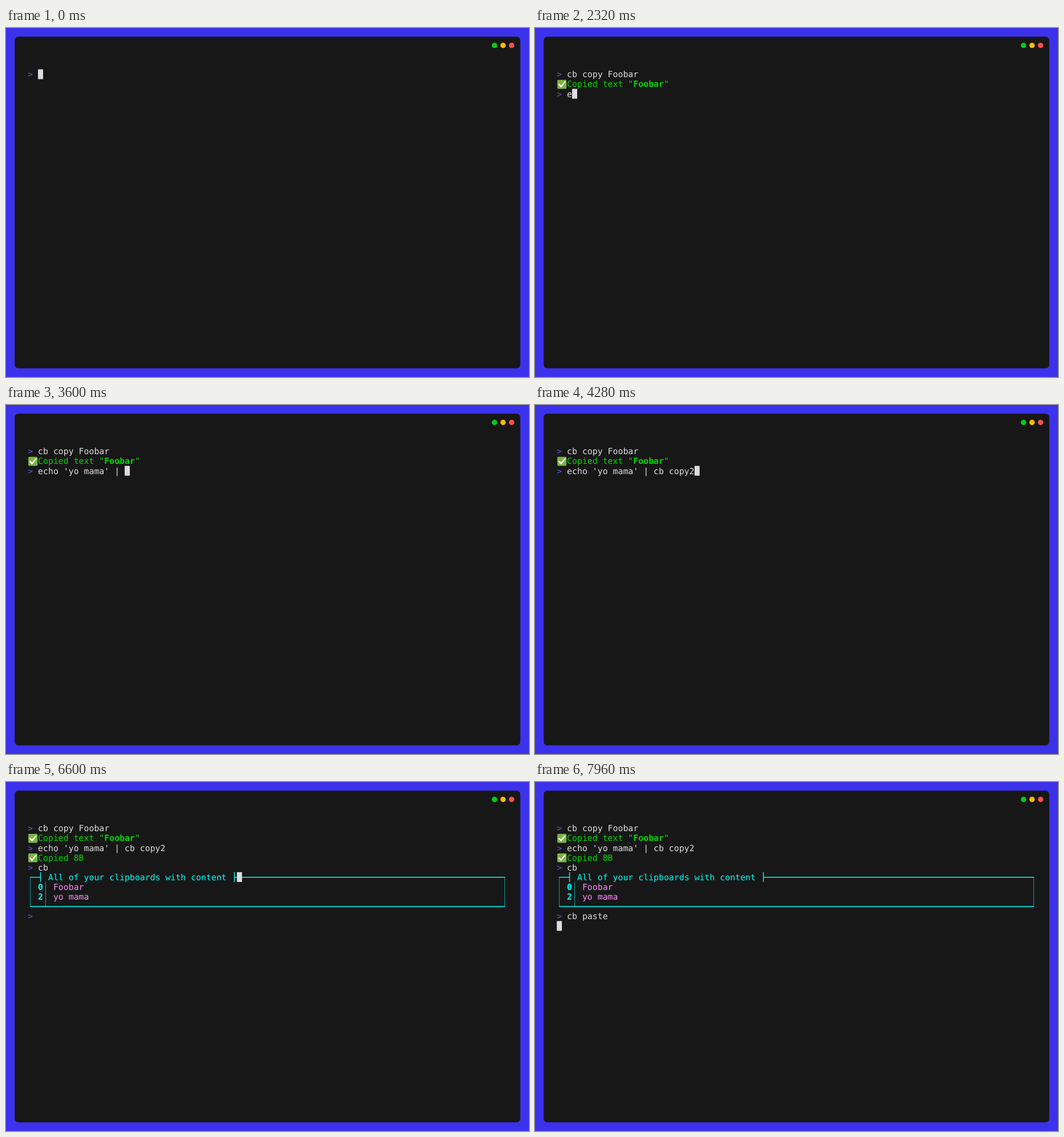
Recreate the animation shown at these times as an HTML page. Size 917x611 px, loop 8000 ms.

```html
<!DOCTYPE html>
<html lang="en">
<head>
<meta charset="utf-8">
<title>Terminal clipboard demo</title>
<style>
  html, body { margin: 0; width: 100%; height: 100%; overflow: hidden; background: #3c32eb; }
  svg { display: block; width: 100%; height: 100%; }
  text {
    font-family: "DejaVu Sans Mono", monospace;
    font-size: 14.856px;
    white-space: pre;
    text-rendering: geometricPrecision;
  }
</style>
</head>
<body>
<svg id="stage" viewBox="0 0 917 611">
  <rect x="15.28" y="15.28" width="886.4" height="580.4" rx="6.1" fill="#171717"/>
  <circle cx="856.6" cy="30.5" r="4.75" fill="#00cc1d"/>
  <circle cx="871.5" cy="30.5" r="4.75" fill="#febb00"/>
  <circle cx="886.5" cy="30.5" r="4.75" fill="#ff4f4d"/>
</svg>
<script>
const LOOP = 8000, TICK = 40;
const X0 = 38.2, Y0 = 72.4, CW = 8.944, LH = 17.1;
const FG = '#dddddd', PROMPT = '#5a56e0', GREEN = '#00d700', CYAN = '#00ffff', PINK = '#ff87ff';

const stage = document.getElementById('stage');
const colX = c => X0 + c * CW;
const rowY = r => Y0 + r * LH;

function add(parent, tag, attrs, content = '') {
  const el = document.createElementNS('http://www.w3.org/2000/svg', tag);
  for (const k in attrs) el.setAttribute(k, attrs[k]);
  el.textContent = content;
  return parent.appendChild(el);
}

// Groups that become visible at a given time.
const blocks = [];
function block(at) {
  const el = add(stage, 'g', {});
  blocks.push({ at, el });
  return el;
}

function write(g, col, row, str, fill, weight = 400) {
  return add(g, 'text', { x: colX(col), y: rowY(row) + 13.9, fill, 'font-weight': weight }, str);
}

const prompt = (g, row) => write(g, 0, row, '>', PROMPT);

function checkMark(g, row) {
  const m = add(g, 'g', { transform: `translate(${colX(0)} ${rowY(row)})` });
  add(m, 'rect', { x: 0.9, y: 1.3, width: 16.2, height: 15.6, rx: 1.6, fill: '#7cb342' });
  add(m, 'path', {
    d: 'M4 9.4 L7.5 13.1 L14.2 4.9', fill: 'none', stroke: '#fff',
    'stroke-width': 2.3, 'stroke-linecap': 'round', 'stroke-linejoin': 'round'
  });
}

function line(g, x1, y1, x2, y2, width = 1.4, opacity = 1) {
  add(g, 'path', { d: `M${x1} ${y1}L${x2} ${y2}`, stroke: CYAN, 'stroke-width': width, opacity });
}

function panel(g, top, bottom) {
  const mid = r => rowY(r) + LH / 2 + 0.3;
  const left = colX(0.5), right = colX(93.5), y1 = mid(top), y2 = mid(bottom);
  const capL = colX(2.5), capR = colX(40.5), rule = colX(3.5);
  line(g, left - 0.4, y1, capL, y1);
  line(g, capR, y1, right + 0.4, y1);
  line(g, left - 0.4, y2, right + 0.4, y2);
  for (const x of [capL, capR]) line(g, x, rowY(top), x, rowY(top + 1));
  for (const x of [left, right]) line(g, x, y1, x, y2, 1, 0.6);
  line(g, rule, rowY(top + 1), rule, y2, 1, 0.6);
  write(g, 4, top, 'All of your clipboards with content', CYAN);
}

let g = block(0);
prompt(g, 0);

g = block(1800);
checkMark(g, 1);
write(g, 2, 1, 'Copied text "', GREEN);
write(g, 15, 1, 'Foobar', GREEN, 700);
write(g, 21, 1, '"', GREEN);
prompt(g, 2);

g = block(5120);
checkMark(g, 3);
write(g, 2, 3, 'Copied 8B', GREEN);
prompt(g, 4);

g = block(6600);
panel(g, 5, 8);
[['0', 'Foobar'], ['2', 'yo mama']].forEach(([key, value], i) => {
  write(g, 2, 6 + i, key, CYAN, 700);
  write(g, 5, 6 + i, value, PINK);
});
prompt(g, 9);

// Cursor events: [time, column, row]; no column means blinked off.
const moves = [
  [0, 2, 0], [1520], [1760, 0, 1], [1800, 2, 2],
  [4840], [5040, 0, 3], [5120, 2, 4],
  [5640], [5760, 3, 4], [6360], [6600, 41, 5], [6640, 2, 9],
  [7120], [7960, 0, 10]
];

// Each run types a number of keys evenly from its first to its last time.
function keyTimes(runs) {
  return runs.flatMap(([from, to, n]) => Array.from({ length: n }, (_, i) =>
    Math.ceil((from + (to - from) * i / Math.max(1, n - 1)) / TICK - 1e-6) * TICK));
}

const commands = [
  { row: 0, str: 'cb copy Foobar', runs: [[40, 840, 12], [920, 1040, 2]] },
  { row: 2, str: "echo 'yo mama' | cb copy2", runs: [[2320, 3080, 11], [3160, 3920, 10], [4000, 4280, 4]] },
  { row: 4, str: 'cb', runs: [[5720, 5840, 2]], lateCursor: true },
  { row: 9, str: 'cb paste', runs: [[7200, 7880, 8]] }
];
for (const cmd of commands) {
  cmd.times = keyTimes(cmd.runs);
  cmd.el = write(stage, 2, cmd.row, '', FG);
  cmd.times.forEach((t, i) => {
    if (i || !cmd.lateCursor) moves.push([t, 3 + i, cmd.row]);
  });
}
moves.sort((a, b) => a[0] - b[0]);

const cursor = add(stage, 'rect', { width: CW, height: LH, fill: FG });

function draw(t) {
  for (const b of blocks) b.el.style.display = t >= b.at ? '' : 'none';
  for (const cmd of commands) {
    const str = cmd.str.slice(0, cmd.times.filter(k => k <= t).length);
    if (cmd.el.textContent !== str) cmd.el.textContent = str;
  }
  const [, col, row] = moves.filter(m => m[0] <= t).pop();
  cursor.style.display = col === undefined ? 'none' : '';
  if (col !== undefined) {
    cursor.setAttribute('x', colX(col));
    cursor.setAttribute('y', rowY(row));
  }
}

const start = performance.now();
function tick() {
  draw((performance.now() - start) % LOOP);
  requestAnimationFrame(tick);
}
tick();
</script>
</body>
</html>
```
